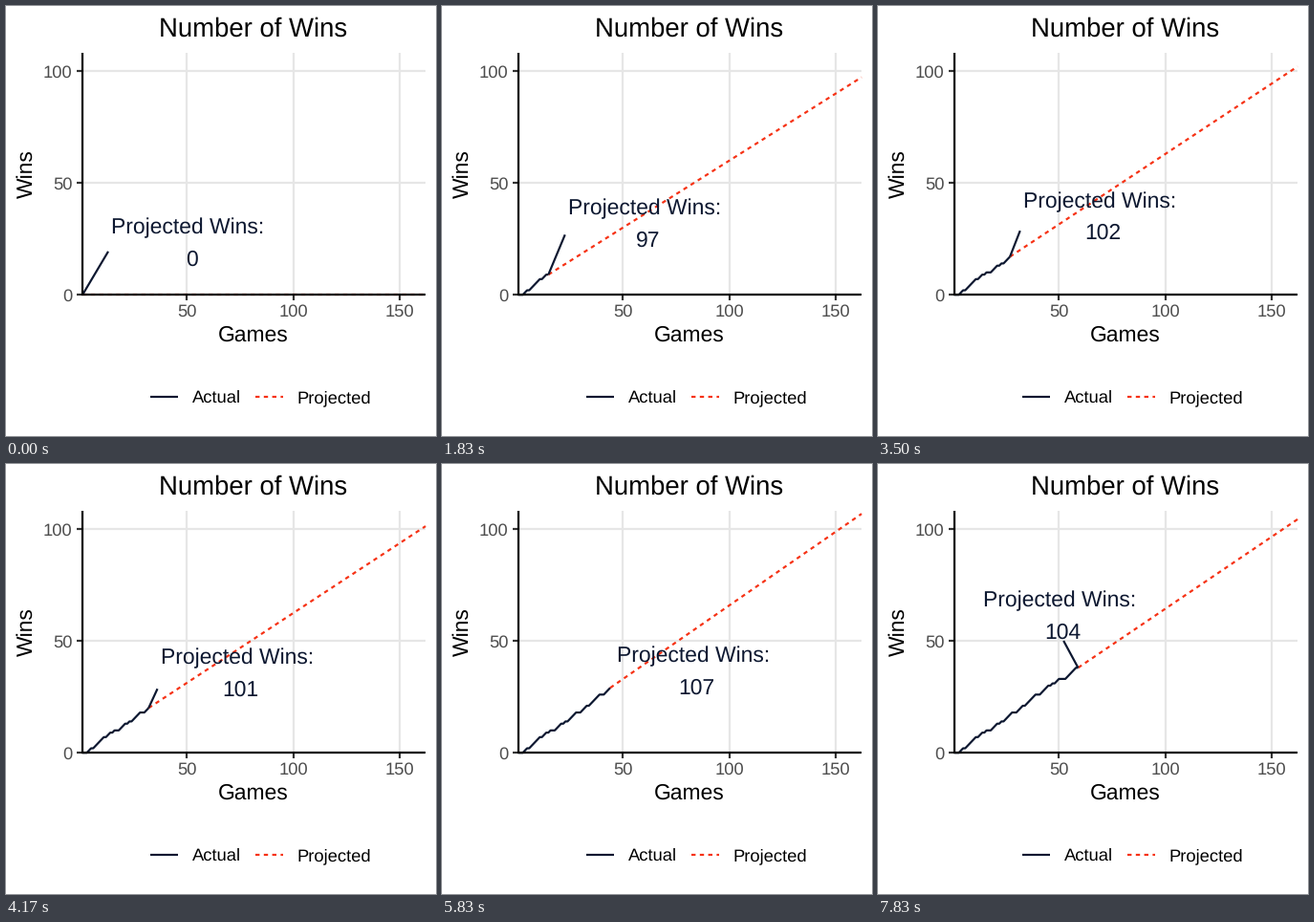
A matplotlib script for the animation above (8000 ms loop, 450 px wide and 450 px high).

```python
import numpy as np
import matplotlib.pyplot as plt
from matplotlib.animation import FuncAnimation

plt.rcParams["font.family"] = "Liberation Sans"
plt.rcParams["text.hinting"] = "none"

LOOP_MS, TICK_MS = 8000, 50
STEPS = 48
STEP_LEAD_MS = 34  # rounds step starts onto the tick grid
SEASON = 162
GAMES_PER_STEP = 1.235

NAVY, RED = "#0c1730", "#f63215"
GRID, TICK, TICK_TEXT = "#e6e6e6", "#333333", "#4d4d4d"
LINE = 2.2
BASE, SMALL, LARGE = 22.9, 18.33, 27.5

# 1 = win, 0 = loss, one digit per game
RESULTS = ("000110111110110100111010111100"
           "11101111100111101011000111110")
WINS = np.cumsum([int(r) for r in RESULTS])

LEFT, RIGHT, TOP, BOTTOM = 80.1, 439.1, 49.0, 302.2

# Label centre: step, x, y
LABEL_PATH = np.array([
    (0, 190.5, 247), (7, 206, 232), (16, 220, 222), (25, 242, 218),
    (30, 261, 230), (33, 262, 238), (39, 264, 172), (42, 190, 170),
    (47, 190, 158),
])
HALF_W, HALF_H = 83.5, 27
MIN_LEADER = 20


def px(game):
    return LEFT + (game - 1) * (RIGHT - LEFT) / (SEASON - 1)


def py(wins):
    return BOTTOM - 2.342 * wins


fig = plt.figure(figsize=(6.25, 6.25), dpi=72, facecolor="white")
ax = fig.add_axes([0, 0, 1, 1])
ax.set_xlim(0, 450)
ax.set_ylim(450, 0)
ax.axis("off")


def line(xs, ys, color, z, **kw):
    return ax.plot(xs, ys, color=color, lw=LINE, zorder=z,
                   solid_capstyle="butt", dash_capstyle="butt", **kw)[0]


def text(x, y, s, size, color="black", ha="center", **kw):
    return ax.text(x, y, s, fontsize=size, color=color, ha=ha,
                   va="baseline", zorder=6, **kw)


def draw_axes():
    for game in (50, 100, 150):
        x = px(game)
        line([x, x], [TOP, BOTTOM], GRID, 1)
        line([x, x], [BOTTOM, BOTTOM + 5.8], TICK, 4)
        text(x, 325.2, str(game), SMALL, TICK_TEXT)
    for wins in (0, 50, 100):
        y = py(wins)
        if wins:
            line([LEFT, RIGHT], [y, y], GRID, 1)
        line([LEFT - 5.8, LEFT], [y, y], TICK, 4)
        text(69.6, y + 6.6, str(wins), SMALL, TICK_TEXT, "right")
    line([LEFT, LEFT], [TOP, BOTTOM + LINE / 2], "black", 5)
    line([LEFT - LINE / 2, RIGHT], [BOTTOM, BOTTOM], "black", 5)
    text(259, 32.2, "Number of Wins", LARGE)
    text(259, 351.2, "Games", BASE)
    text(28, 176, "Wins", BASE, rotation=90, rotation_mode="anchor")


def draw_legend():
    line([151, 180], [409.3, 409.3], NAVY, 3)
    line([261, 290], [409.3, 409.3], RED, 3, ls=(0, (2, 2)))
    text(194.5, 415.2, "Actual", SMALL, ha="left")
    text(304, 415.2, "Projected", SMALL, ha="left")


def leader_end(x, y, cx, cy):
    """Nearest spot on the label's box, pulled towards the side's middle."""
    ex = np.clip(x, cx - HALF_W, cx + HALF_W)
    ey = np.clip(y, cy - HALF_H, cy + HALF_H)
    dist = np.hypot(x - ex, y - ey)
    to_row = np.hypot(x - cx, y - ey)
    to_col = np.hypot(x - ex, y - cy)
    if ex == x:
        ex += (cx - ex) * (0.25 + 0.65 * dist / max(to_row, 1))
    elif ey == y or to_col <= to_row:
        ey += (cy - ey) * dist / max(to_col, 1)
    else:
        ex += (cx - ex) * dist / max(to_row, 1)
    return ex, ey


draw_axes()
draw_legend()
projected = line([], [], RED, 2, ls=(0, (2, 2)))
actual = line([], [], NAVY, 3, solid_joinstyle="round")
leader = line([], [], NAVY, 3)
caption = text(0, 0, "Projected Wins:", BASE, NAVY)
count = text(0, 0, "", BASE, NAVY)


def update(tick):
    step = int((tick * TICK_MS + STEP_LEAD_MS) * STEPS / LOOP_MS) % STEPS
    game = 1 + int(round(step * GAMES_PER_STEP))
    wins = WINS[game - 1]
    total = wins / game * SEASON
    x, y = px(game), py(wins)

    actual.set_data(px(np.arange(1, game + 1)), py(WINS[:game]))
    projected.set_data([x, RIGHT], [y, py(total)])

    steps, xs, ys = LABEL_PATH.T
    cx, cy = np.interp(step, steps, xs), np.interp(step, steps, ys)
    caption.set_position((cx, cy - 9))
    count.set_position((cx + 3.5, cy + 24.5))
    count.set_text(f"{total:.0f}")

    ex, ey = leader_end(x, y, cx, cy)
    leader.set_data([x, ex], [y, ey])
    leader.set_visible(bool(np.hypot(ex - x, ey - y) >= MIN_LEADER))
    return projected, actual, leader, caption, count


anim = FuncAnimation(fig, update, frames=LOOP_MS // TICK_MS, interval=TICK_MS,
                     repeat=True, repeat_delay=0, blit=False)
plt.show()
```
